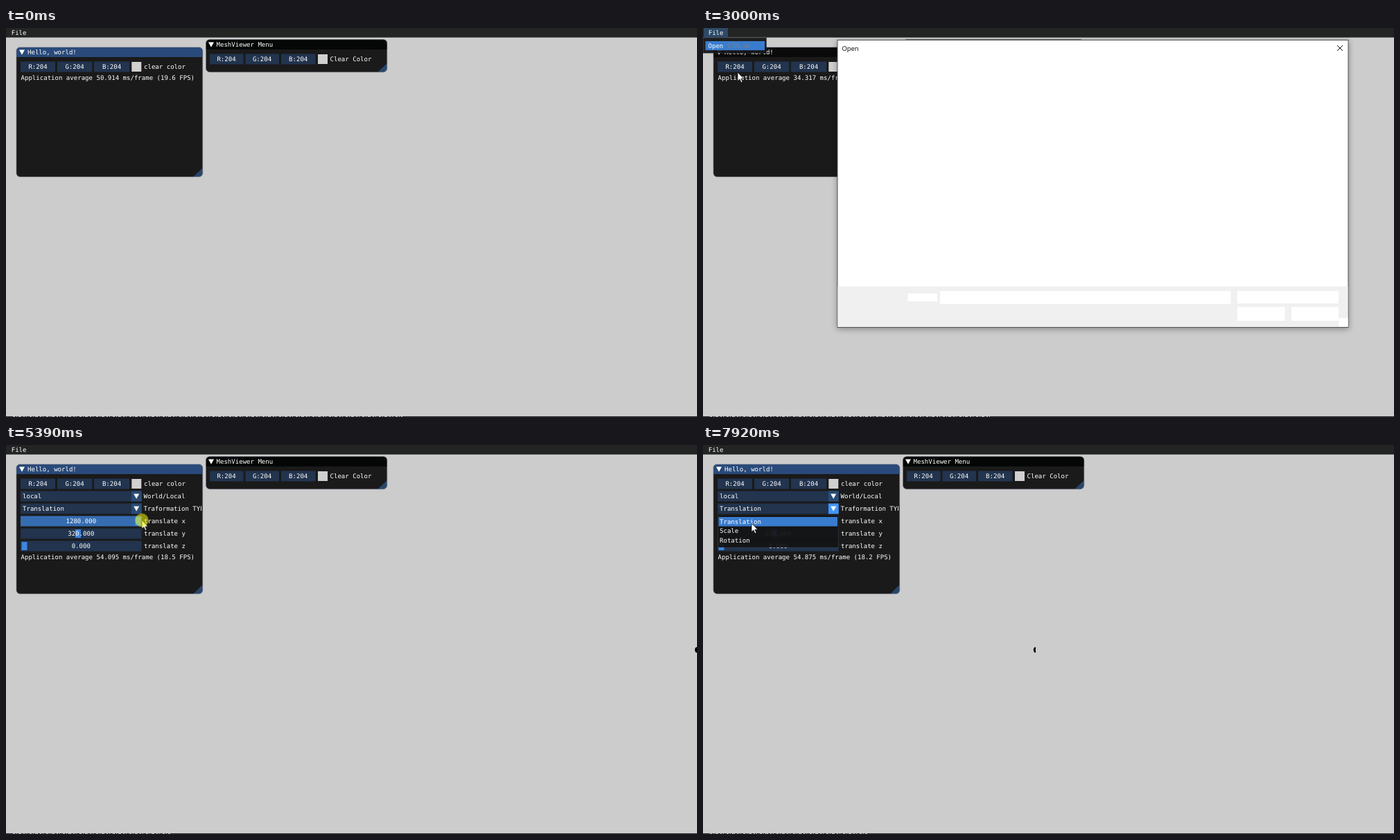
These frames come from a looping animation (997x562 px, 8 s). An HTML page:

```html
<!DOCTYPE html>
<html lang="en">
<head>
<meta charset="utf-8">
<title>Mesh viewer</title>
<style>
html, body { margin: 0; width: 100%; height: 100%; overflow: hidden; background: #ccc; }
svg { display: block; width: 100%; height: 100%; }
text { font: 9.06px "DejaVu Sans Mono", monospace; fill: #fff; text-rendering: geometricPrecision; }
.mid { text-anchor: middle; }
.dim { fill: #808080; }
.win { fill: #1a1a1a; }
.edge { fill: none; stroke: #6e6e80; stroke-opacity: .6; }
.field { fill: #22344e; }
.grip { fill: #4296fa; opacity: .25; }
.swatch { fill: #d0d0d0; }
.arrow { fill: #2a4c74; }
.grab { fill: #3d85e0; }
.hot { fill: #397cce; }
.pop { fill: #141414; opacity: .94; }

#title, #menu, #fileTab, #late, #fps, #dialog, #combo, #comboArrow, #rowX, #press {
  animation: 8s step-end infinite;
}
#title { animation-name: title; }
#menu { animation-name: menu; }
#fileTab { animation-name: tab; }
#late { animation-name: late; }
#fps { animation-name: fps; }
#dialog { animation-name: dialog; filter: drop-shadow(0 2px 4px rgba(0, 0, 0, .35)); }
#combo { animation-name: combo; }
#comboArrow { animation-name: combo-arrow; }
#rowX { animation-name: row; }
#press { animation-name: press; fill: #eeee0a; }
#cursor { animation: move 8s linear infinite; }

@keyframes title { 0% { fill: #294a7a } 16.5% { fill: #0a0a0a } 54.4%, 100% { fill: #294a7a } }
@keyframes menu { 0% { opacity: 0 } 16.5% { opacity: 1 } 54.4%, 100% { opacity: 0 } }
@keyframes tab { 0% { opacity: 0 } 12.8% { opacity: 1 } 54.4%, 100% { opacity: 0 } }
@keyframes late { 0% { opacity: 0 } 54.4%, 100% { opacity: 1 } }
@keyframes fps { 0% { transform: none } 54.4%, 100% { transform: translateY(90px) } }
@keyframes dialog { 0% { opacity: 0 } 35.25% { opacity: 1 } 51.1%, 100% { opacity: 0 } }
@keyframes combo { 0% { opacity: 0 } 94%, 100% { opacity: 1 } }
@keyframes combo-arrow { 0% { fill: #2a4c74 } 92.6%, 100% { fill: #4296fa } }
@keyframes row {
  0% { fill: #22344e }
  58% { fill: #2a4c74 }
  59.4% { fill: #356db0 }
  70.6% { fill: #22344e }
  78.1% { fill: #356db0 }
  89% { fill: #2a4c74 }
  91%, 100% { fill: #22344e }
}
@keyframes press {
  0%, 17.5%, 28.5%, 49.4%, 52.9%, 70.6%, 89%, 94.75%, 100% { opacity: 0 }
  16.25%, 26.9%, 48.1%, 51%, 59.4%, 78.1%, 93.5% { opacity: .58 }
}
@keyframes move {
  0%, .49% { transform: translate(1010px, 580px) }
  .5% { transform: translate(918px, 541px); animation-timing-function: ease-in-out }
  9.75%, 10.6% { transform: translate(84px, 26px) }
  13.1%, 20.5% { transform: translate(18px, 8px); animation-timing-function: ease-in-out }
  25%, 29% { transform: translate(19px, 23px) }
  31.75% { transform: translate(48px, 62px) }
  32.75%, 39.4% { transform: translate(50px, 64px); animation-timing-function: ease-in-out }
  46.2%, 53.8% { transform: translate(390px, 145px); animation-timing-function: ease-in-out }
  58.1%, 59.75% { transform: translate(108.5px, 108.7px) }
  66.1% { transform: translate(196px, 108.7px) }
  78.1% { transform: translate(196px, 108px) }
  85.7% { transform: translate(115px, 108px) }
  88.1%, 90% { transform: translate(105px, 108px) }
  92.75%, 94.4% { transform: translate(80px, 92px) }
  96.5% { transform: translate(75px, 105px) }
  98.9%, 100% { transform: translate(70px, 113px) }
}
</style>
</head>
<body>
<svg viewBox="0 0 997 562">
  <defs>
    <path id="down" d="M-4-3.6h8l-4 7.4z" fill="#fff"/>
    <clipPath id="panelClip"><rect x="15" y="28" width="266.5" height="187"/></clipPath>
  </defs>

  <rect width="997" height="562" fill="#ccc"/>
  <path id="mesh" d="M0-4C-4-4.2-4 3-.8 4H0z"/>

  <!-- main panel -->
  <rect class="win" x="15" y="28" width="268.7" height="187" rx="5.5"/>
  <path id="title" d="M15 42v-8.5q0-5.5 5.5-5.5h257.7q5.5 0 5.5 5.5v8.5z"/>
  <path class="grip" d="M283.7 202v7.5q0 5.5-5.5 5.5h-8z" style="opacity:.36"/>
  <rect class="edge" x="15" y="27.8" width="268.7" height="187.2" rx="5.5"/>
  <use href="#down" x="23" y="35"/>
  <text x="31" y="38.2">Hello, world!</text>
  <g class="field">
    <rect x="21" y="48.5" width="50" height="15"/>
    <rect x="74" y="48.5" width="50.3" height="15"/>
    <rect x="127" y="48.5" width="51" height="15"/>
  </g>
  <g class="mid">
    <text x="46" y="59.2">R:204</text>
    <text x="99" y="59.2">G:204</text>
    <text x="152.5" y="59.2">B:204</text>
  </g>
  <rect class="swatch" x="181.3" y="49" width="14" height="14"/>
  <text x="199" y="59.2">clear color</text>

  <g id="late" clip-path="url(#panelClip)">
    <g class="field">
      <rect x="21" y="66.5" width="174.7" height="15"/>
      <rect x="21" y="84.5" width="174.7" height="15"/>
      <rect id="rowX" x="21" y="102.5" width="174.7" height="15"/>
      <rect x="21" y="120.5" width="174.7" height="15"/>
      <rect x="21" y="138.5" width="174.7" height="15"/>
    </g>
    <rect class="arrow" x="181" y="66.5" width="14.7" height="15"/>
    <rect class="arrow" id="comboArrow" x="181" y="84.5" width="14.7" height="15"/>
    <use href="#down" x="188.2" y="74"/>
    <use href="#down" x="188.2" y="92"/>
    <rect id="grabX" y="104" width="8" height="12" fill="#4296fa"/>
    <rect class="grab" x="100" y="122" width="8" height="12"/>
    <rect class="grab" x="22.5" y="140" width="8" height="12"/>
    <text x="24" y="77.2">local</text>
    <text x="24" y="95.2">Translation</text>
    <g class="mid">
      <text id="valueX" x="108.3" y="113.2">640.000</text>
      <text x="108.3" y="131.2">320.000</text>
      <text x="108.3" y="149.2">0.000</text>
    </g>
    <text x="198.5" y="77.2">World/Local</text>
    <text x="198.5" y="95.2">Traformation TYPE</text>
    <text x="199" y="113.2">translate x</text>
    <text x="199" y="131.2">translate y</text>
    <text x="199" y="149.2">translate z</text>
  </g>
  <text id="fps" x="21.5" y="75.2"></text>

  <g id="combo">
    <rect class="pop" x="21.5" y="101" width="174" height="47"/>
    <rect class="edge" x="21.5" y="101" width="174" height="47" style="stroke-opacity:.2"/>
    <rect class="hot" x="22.5" y="104" width="171.5" height="13.5"/>
    <text x="24" y="114.2">Translation</text>
    <text x="24" y="127.4">Scale</text>
    <text x="24" y="140.8">Rotation</text>
  </g>

  <!-- second panel -->
  <rect class="win" x="288.5" y="16.7" width="261.3" height="47" rx="5.5"/>
  <path d="M288.5 31v-8.8q0-5.5 5.5-5.5h250.3q5.5 0 5.5 5.5v8.8z" fill="#050707"/>
  <path class="grip" d="M549.8 51v7.2q0 5.5-5.5 5.5h-8z" style="opacity:.36"/>
  <rect class="edge" x="288.5" y="16.7" width="261.3" height="47" rx="5.5"/>
  <use href="#down" x="296" y="24"/>
  <text x="303.5" y="27.4">MeshViewer Menu</text>
  <g class="field">
    <rect x="294" y="37.5" width="48.5" height="15"/>
    <rect x="345.5" y="37.5" width="48.5" height="15"/>
    <rect x="397" y="37.5" width="49.5" height="15"/>
  </g>
  <g class="mid">
    <text x="318" y="48.4">R:204</text>
    <text x="369.5" y="48.4">G:204</text>
    <text x="421.7" y="48.4">B:204</text>
  </g>
  <rect class="swatch" x="450" y="38" width="14" height="14"/>
  <text x="467.5" y="48.4">Clear Color</text>

  <!-- menu bar -->
  <rect width="997" height="13.7" fill="#232525"/>
  <rect id="fileTab" x="1" width="35" height="13.7" fill="#2d4966"/>
  <text x="7.7" y="10.3">File</text>
  <g id="menu">
    <rect class="pop" y="14" width="91.7" height="22.4"/>
    <rect class="edge" x=".5" y="14.3" width="91" height="22" style="stroke-opacity:.25"/>
    <rect class="hot" x="3.5" y="19" width="85.5" height="13.2"/>
    <text x="7.5" y="29.2">Open</text>
    <text class="dim" x="35" y="29.2">CTRL+O</text>
  </g>

  <!-- console edge at the bottom -->
  <rect y="561" width="997" height="1" fill="#222"/>
  <line id="foot" x1="10" y1="561.5" y2="561.5" stroke="#aaa" stroke-dasharray="3 2 1 2 4 3 2 2 1 4"/>

  <g id="dialog">
    <rect x="194" y="17.5" width="737" height="415" fill="#fff" stroke="#555"/>
    <rect x="194.5" y="373.5" width="736" height="58.5" fill="#f0f0f0"/>
    <g fill="#fff">
      <rect x="295.5" y="383.5" width="42.5" height="11.5"/>
      <rect x="342" y="380" width="419.5" height="18.7"/>
      <rect x="771" y="380" width="146" height="18"/>
      <rect x="771" y="403" width="68.5" height="20"/>
      <rect x="849" y="403" width="68" height="20"/>
      <rect x="917.5" y="419" width="13" height="12.5"/>
    </g>
    <text x="200.5" y="33.2" style="font:9.4px 'Open Sans',sans-serif;fill:#000">Open</text>
    <path d="M915 25l8 8m0-8l-8 8" stroke="#111" fill="none"/>
  </g>

  <g id="cursor">
    <path d="M0 0v12.6l2.9-2.7 2.1 4.8 2-.9-2.1-4.6h4z" fill="#fff" stroke="#111" stroke-width=".8"/>
    <circle id="press" r="9.7"/>
  </g>
</svg>
<script>
const LOOP = 8000, SCALE = 997 / 1280;
const $ = id => document.getElementById(id);

// [time, value] pairs, linear in between
const frameMs = [[0, 50.914], [40, 50.914], [2200, 59.134], [2250, 59.134], [2540, 59.9],
  [2541, 34.317], [4350, 34.317], [4480, 52.6], [5390, 54.095], [5440, 54.095],
  [6850, 55.211], [6900, 55.211], [7890, 54.875], [8000, 54.875]];
const shiftX = [[0, 640], [4780, 640], [5250, 1245], [5290, 1280], [6250, 1280],
  [6850, 737.524], [6900, 737.524], [6901, 690], [7050, 616.195], [8000, 616.195]];
const footEnd = [[4480, 237], [3700, 735], [2820, 415], [2540, 614], [0, 572]];

function at(keys, t) {
  const i = Math.max(1, keys.findIndex(k => k[0] >= t));
  const [t0, a] = keys[i - 1], [t1, b] = keys[i];
  return a + (b - a) * (t - t0) / (t1 - t0);
}

function draw(t) {
  const ms = at(frameMs, t), x = at(shiftX, t);
  $('fps').textContent =
    `Application average ${ms.toFixed(3)} ms/frame (${(1000 / ms).toFixed(1)} FPS)`;
  $('valueX').textContent = x.toFixed(3);
  $('grabX').setAttribute('x', 22.5 + 164 * x / 1280);
  $('mesh').setAttribute('transform', `translate(${x * SCALE} 296)`);
  $('mesh').setAttribute('opacity', t < 4350 ? 0 : 1);
  $('foot').setAttribute('x2', footEnd.find(k => t >= k[0])[1]);
}

let start;
function tick(now) {
  start ??= now;
  draw(Math.floor((now - start) % LOOP / 10) * 10);
  requestAnimationFrame(tick);
}
draw(0);
requestAnimationFrame(tick);
</script>
</body>
</html>
```
